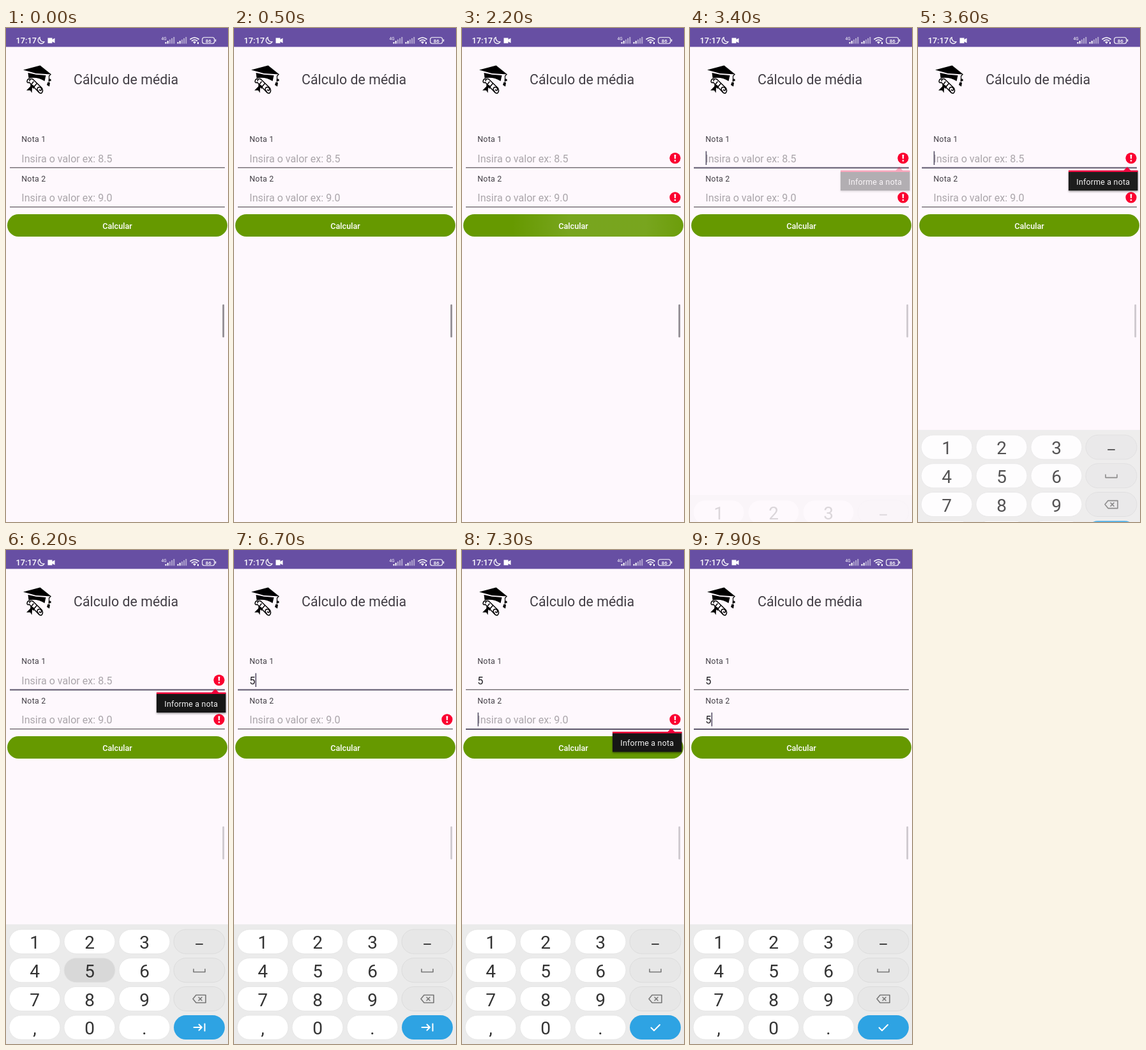
Write an HTML page that moves like this. It is 348 by 772 pixels and loops after 8 s.

```html
<!DOCTYPE html>
<html lang="pt">
<head>
<meta charset="utf-8">
<title>Cálculo de média</title>
<style>
  html, body { margin: 0; width: 100%; height: 100%; overflow: hidden; background: #fef8fd; }
  svg { display: block; width: 348px; height: 772px; font-family: Roboto, sans-serif; }
  .small { font-size: 12.4px; letter-spacing: .22px; }
  .input { font-size: 16.1px; }
  .key { font-size: 28px; fill: #333; text-anchor: middle; }
  .line { fill: none; stroke-linecap: round; stroke-linejoin: round; }
</style>
</head>
<body>
<svg viewBox="0 0 348 772">
  <defs>
    <radialGradient id="ripple" gradientUnits="userSpaceOnUse" cx="228" cy="309" r="150">
      <stop offset=".4" stop-color="#fff" stop-opacity=".12"/>
      <stop offset="1" stop-color="#fff" stop-opacity="0"/>
    </radialGradient>
    <filter id="shadow" x="-10%" y="-30%" width="120%" height="170%">
      <feDropShadow dx="0" dy="1.5" stdDeviation="1.5" flood-opacity=".45"/>
    </filter>
  </defs>

  <rect width="348" height="29.5" fill="#674fa3"/>
  <g fill="#fff">
    <text x="15.5" y="24" font-size="12.8" font-weight="500">17:17</text>
    <path class="line" d="M53 14.5A5.2 5.2 0 1 0 60 21.5A6 6 0 0 1 53 14.5Z" stroke="#fff" stroke-width="1.3"/>
    <path d="M65.5 15.5h7v2.5l4-2.2v7.6l-4-2.2v2.5h-7z"/>
    <text x="243.5" y="18.5" font-size="6.5">4G</text>
    <g id="signals"></g>
    <g class="line" stroke="#fff" stroke-width="1.6">
      <path d="M289 17.5Q295.500 12.500 302 17.500M291.500 20Q295.500 17 299.500 20"/>
    </g>
    <path d="M293 21.800Q295.500 20 298 21.800L295.500 24.800ZM300 22h2v3h-2z"/>
    <rect x="307.700" y="14.700" width="19" height="9.600" rx="3" fill="none" stroke="#fff" stroke-width="1.100"/>
    <rect x="327.800" y="17.500" width="1.400" height="4" rx=".7"/>
    <text x="317.200" y="22.500" font-size="8" font-weight="500" text-anchor="middle">86</text>
  </g>

  <g id="cap">
    <path d="M27 65.500L53.500 58.500L71 72.500L47 71Z"/>
    <path d="M34.500 70L47 72.800L62.500 74L60.500 83Q49 75.500 35.500 78.500Z"/>
    <path class="line" d="M70 72.500L67.500 75V84" stroke="#000" stroke-width="1.200"/>
    <path d="M67 79l3.500 1v3l-4-.5zM65.500 84.500l3.500 1l-1 6l-4-2.500z"/>
    <g class="line" stroke="#000" stroke-width="1.500">
      <path d="M37 79.500Q33 79.500 33 84Q34 86.500 36.500 85L50.500 99.500Q53 103 56 101.500Q59 98 56 93.500L42 80Q38 78 37 82.500"/>
      <path d="M51 99Q47 95 51 92.500Q56 92 55.500 96.500Q54 99 52.500 96.500M43 84L39 89M48 87L43 93"/>
    </g>
    <path d="M39 87.500L45 91L43.500 95L41 93L40.500 101.500L38 97.500L32 97.500L38 91.500Z"/>
  </g>
  <text x="106" y="88" font-size="21.400" fill="#423e45">Cálculo de média</text>

  <g id="fields"></g>
  <rect x="2" y="291" width="345" height="35" rx="17.500" fill="#690"/>
  <rect id="glow" x="2" y="291" width="345" height="35" rx="17.500" fill="url(#ripple)"/>
  <text x="174.500" y="313.500" font-size="12.700" font-weight="500" fill="#fff" text-anchor="middle">Calcular</text>
  <rect id="scrollbar" x="339.300" y="432" width="2.800" height="51.500" rx="1" fill="#857f86"/>
  <g id="popups"></g>
  <g id="keyboard"></g>
</svg>
<script>
const $ = id => document.getElementById(id);
const ramp = (t, from, to) => Math.min(1, Math.max(0, (t - from) / (to - from)));
const within = (t, spans) => spans.some(([from, to]) => t >= from && t < to);
const show = (el, visible) => el.setAttribute('opacity', +visible);

const bar = (x, i) => `<rect x="${x + i * 3.2}" y="${22 - i * 2}" width="2" height="${2.5 + i * 2}" opacity="${i < 2 ? 1 : .5}"/>`;
$('signals').innerHTML = [249.5, 268.5].map(x => [0, 1, 2, 3, 4].map(i => bar(x, i)).join('')).join('');

const fields = [
  { label: 'Nota 1', hint: 'Insira o valor ex: 8.5', y: 0, typed: 6400,
    caret: [[3400, 4000], [4500, 5000], [5500, 6000], [6400, 6900]] },
  { label: 'Nota 2', hint: 'Insira o valor ex: 9.0', y: 61.5, typed: 7800,
    caret: [[6900, 7600], [7800, 8000]] }
];

$('fields').innerHTML = fields.map((f, i) => `
  <g transform="translate(0 ${f.y})">
    <text class="small" x="24.3" y="178" fill="#423e45">${f.label}</text>
    <text class="input" id="text${i}" x="24.3" y="209.5"></text>
    <rect id="line${i}" x="6" width="337"/>
    <rect id="caret${i}" y="192.5" width="1.7" height="21.5" fill="#605a70"/>
    <g id="error${i}">
      <circle cx="334" cy="203.3" r="8.6" fill="#fb0030"/>
      <path d="M332.6 198h2.8l-.5 6.600h-1.800zM332.800 206.200h2.400v2.400h-2.400z" fill="#fff"/>
    </g>
  </g>`).join('');

$('popups').innerHTML = fields.map((f, i) => `
  <g id="popup${i}" transform="translate(0 ${f.y})">
    <rect x="236" y="223" width="108.500" height="31" fill="#191919" filter="url(#shadow)"/>
    <path d="M236 222.500H322.500L328 217L333.500 222.500H344.500V225H236Z" fill="#f0003a"/>
    <text class="small" x="248.300" y="244.800" fill="#f4f4f4">Informe a nota</text>
  </g>`).join('');

function key(label, i) {
  const col = i % 4, x = 5 + col * 86, y = 593 + (i >> 2) * 44.7;
  const fill = i === 15 ? '#2ea3e3' : col === 3 ? '#e7e7e7' : '#fff';
  const edge = i === 15 ? 'none' : col === 3 ? '#d9d9d9' : '#e2e2e2';
  return `<rect id="key${i}" x="${x}" y="${y}" width="80" height="38" rx="19" fill="${fill}" stroke="${edge}" stroke-width=".8"/>
    <text class="key" x="${x + 40}" y="${y + 30.3}">${label}</text>`;
}
$('keyboard').innerHTML = '<rect y="585" width="348" height="187" fill="#ebebeb"/>' +
  ['1', '2', '3', '', '4', '5', '6', '', '7', '8', '9', '', ',', '0', '.', ''].map(key).join('') + `
  <g class="line" stroke="#777" stroke-width="1.600">
    <path d="M298 616H308" stroke="#444" stroke-width="2"/>
    <path d="M294 655V659.500H312V655"/>
    <path d="M298 695.500H313V707.500H298L293 701.500ZM302 699l5 5M307 699l-5 5"/>
    <path id="next" d="M294.500 746H307M302.500 741.500L307 746L302.500 750.500M311.500 740.500V751.500" stroke="#fff" stroke-width="2"/>
    <path id="done" d="M296.500 746.500L301 751L310 742" stroke="#fff" stroke-width="2"/>
  </g>`;

function render(t) {
  const focus = t < 3400 ? -1 : t < 6900 ? 0 : 1;

  fields.forEach((f, i) => {
    const filled = t >= f.typed, active = focus === i;
    const text = $('text' + i), line = $('line' + i), caret = $('caret' + i);
    text.textContent = filled ? '5' : f.hint;
    text.setAttribute('fill', filled ? '#1d1b20' : '#aaa5aa');
    line.setAttribute('y', active ? 217.5 : 217.7);
    line.setAttribute('height', active ? 2 : 1.1);
    line.setAttribute('fill', active ? '#5c566b' : '#4b474d');
    caret.setAttribute('x', filled ? 33.4 : 24.5);
    show(caret, within(t, f.caret));
    show($('error' + i), t >= 2200 && !filled);
    const opened = i ? ramp(t, 7000, 7300) : ramp(t, 3300, 3610);
    show($('popup' + i), opened * (1 - ramp(t, f.typed - 100, f.typed + 100)));
  });

  $('ripple').setAttribute('r', 150 + Math.max(0, t - 2200) * .9);
  show($('glow'), t < 2200 ? 0 : 1 - ramp(t, 2500, 3000));
  show($('scrollbar'), .9 - .5 * ramp(t, 2200, 3000));

  const slide = 187 * (1 - ramp(t, 3340, 3840)) ** 2;
  $('keyboard').setAttribute('transform', `translate(0 ${slide})`);
  show($('keyboard'), ramp(t, 3350, 3650));
  $('key5').setAttribute('fill', within(t, [[6100, 6400], [7600, 7800]]) ? '#d8d8d8' : '#fff');
  show($('next'), t < 7100);
  show($('done'), t >= 7100);
}

const start = performance.now();
function tick() {
  render(Math.floor((performance.now() - start) % 8000 / 100) * 100);
  requestAnimationFrame(tick);
}
tick();
</script>
</body>
</html>
```
